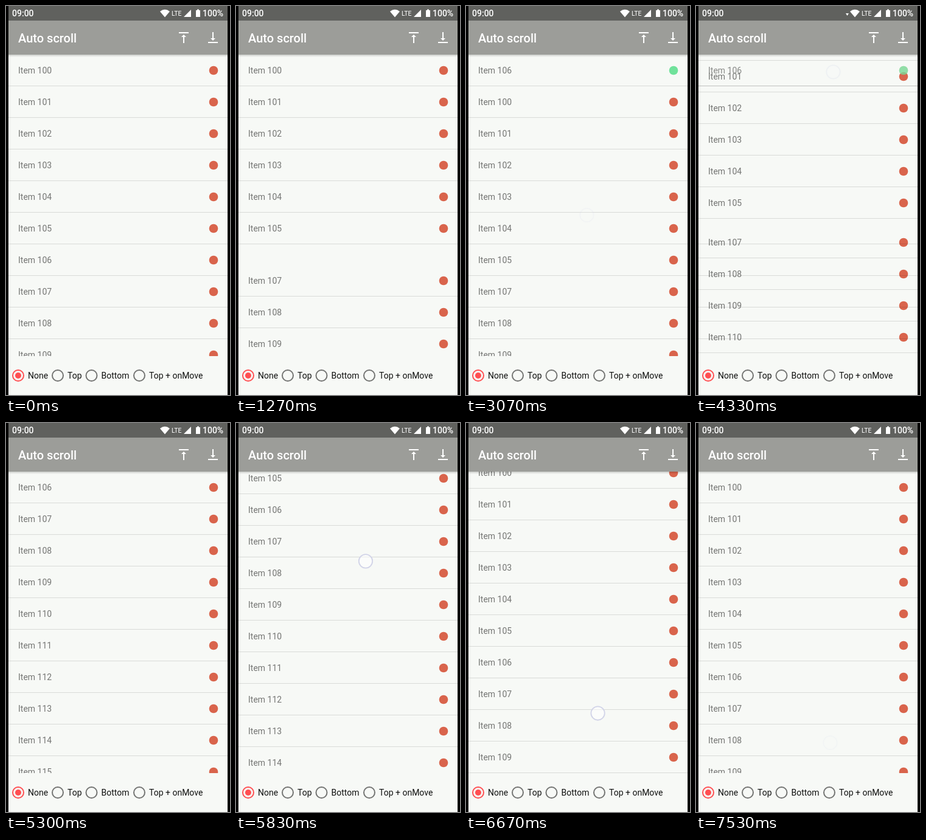
Write an HTML page with a canvas that moves like this. It is 368 px wide and 640 px high and loops after 8070 ms.

```html
<!DOCTYPE html>
<html lang="en">
<head>
<meta charset="utf-8">
<title>Auto scroll</title>
<style>
html, body { margin: 0; width: 100%; height: 100%; overflow: hidden; background: #000; }
canvas { display: block; width: 368px; height: 640px; }
</style>
</head>
<body>
<canvas id="stage"></canvas>
<script>
const W = 368, H = 640, LOOP = 8070, ROW = 52;
const BG = '#f7f9f6', RED = '#d9644c', GREEN = '#70e29b', ACCENT = '#ff4f52';
const canvas = document.getElementById('stage');
const ctx = canvas.getContext('2d');
const ratio = window.devicePixelRatio || 1;
canvas.width = W * ratio;
canvas.height = H * ratio;

const alignTop = new Path2D('M8 11h3v10h2V11h3l-4-4-4 4zM4 3v2h16V3H4z');
const alignBottom = new Path2D('M16 13h-3V3h-2v10H8l4 4 4-4zM4 19v2h16v-2H4z');
const wifi = new Path2D('M253 9Q261 2.6 269 9L261 18.4z');
const signal = new Path2D('M292 18L304 6V18z');
const battery = new Path2D('M312 7h2v-1.5h3V7h2v11h-7z');
const activity = new Path2D('M246 12h5l-2.5 4z');

// Drag keys: time, travel past touch slop, speed (px/ms), pointer x
const drags = [
  { keys: [[2000, -8, 0.06, 193], [2430, 44, 0.13, 196], [2800, 76, 0, 198.5]], top: 268, max: 52, release: 2830, until: 4030 },
  { keys: [[5600, -8, 0.02, 212], [5830, 37, 0.36, 213], [6230, 181, 0.31, 213.5], [7230, 336, 0, 220.5]], top: 190, max: 312, release: 7260, until: LOOP }
];
const taps = [{ at: 870, x: 222, y: 418 }, { at: 4030, x: 225.5, y: 108.5 }];

const clamp = (v, lo = 0, hi = 1) => Math.min(hi, Math.max(lo, v));
const span = (t, start, length) => clamp((t - start) / length);
const ease = p => (1 - Math.cos(Math.PI * p)) / 2;
const slotY = slot => 106 + ROW * slot;

function dragAt({ keys }, t) {
  t = clamp(t, keys[0][0], keys[keys.length - 1][0]);
  const i = keys.findIndex((k, j) => j > 0 && t <= k[0]);
  const [t0, a, va, xa] = keys[i - 1], [t1, b, vb, xb] = keys[i];
  const d = t1 - t0, p = (t - t0) / d, q = 1 - p;
  const travel = q * q * (1 + 2 * p) * a + p * p * (3 - 2 * p) * b
    + d * p * q * (q * va - p * vb);
  return { travel, x: xa + (xb - xa) * p };
}

const scrollAt = (drag, t) => Math.round(clamp(dragAt(drag, t).travel, 0, drag.max));

function text(str, x, y, size, color, weight = 400) {
  ctx.font = `${weight} ${size}px Roboto, sans-serif`;
  ctx.fillStyle = color;
  ctx.fillText(str, x, y);
}

function disc(x, y, r, color) {
  ctx.beginPath();
  ctx.arc(x, y, r, 0, Math.PI * 2);
  ctx.fillStyle = color;
  ctx.fill();
}

function ring(x, y, r, color, width = 2) {
  ctx.beginPath();
  ctx.arc(x, y, r, 0, Math.PI * 2);
  ctx.strokeStyle = color;
  ctx.lineWidth = width;
  ctx.stroke();
}

function row(n, y, alpha = 1, color = RED) {
  if (y < 40 || y > 610) return;
  y = Math.round(y);
  ctx.fillStyle = 'rgba(0,0,0,.12)';
  ctx.fillRect(4, y + 25, 360, 1);
  ctx.globalAlpha = alpha;
  text('Item ' + n, 20, y + 5, 14, '#747573');
  disc(341, y, 7.3, color);
  ctx.globalAlpha = 1;
}

// Slot of each item once 106 sits in front of 100
const pinnedSlot = n => n === 106 ? 0 : n < 106 ? n - 99 : n - 100;

function rowsBefore(t) {
  const gone = span(t, 1050, 120), shift = ROW * ease(span(t, 1170, 250));
  for (let n = 100; n <= 110; n++) {
    if (n !== 106) row(n, slotY(n - 100) - (n > 106 ? shift : 0));
    else if (gone < 1) row(n, slotY(6), 1 - gone);
  }
}

function rowsPinned(t) {
  const offset = scrollAt(drags[0], t) - ROW;
  for (let n = 100; n <= 111; n++)
    row(n, slotY(pinnedSlot(n)) + offset, 1, n === 106 ? GREEN : RED);
}

function rowsMoving(t) {
  const linear = span(t, 4246, 250), p = ease(linear);
  for (let n = 100; n <= 110; n++) {
    if (n === 106) continue;
    const from = slotY(pinnedSlot(n)), to = slotY(n - 106);
    row(n, from + (to - from) * p);
  }
  if (linear > 0) {
    row(106, slotY(0), p);
    for (let n = 111; n <= 115; n++) row(n, slotY(n - 106), span(t, 4496, 120));
  }
  if (linear < 1) row(106, slotY(0), 1 - p, GREEN);
}

function rowsAfter(t) {
  const offset = scrollAt(drags[1], t);
  for (let n = 100; n <= 115; n++) row(n, slotY(n - 106) + offset);
}

function list(t) {
  ctx.save();
  ctx.beginPath();
  ctx.rect(4, 80, 360, 496);
  ctx.clip();
  if (t < 1420) rowsBefore(t);
  else if (t < 4030) rowsPinned(t);
  else if (t < 4616) rowsMoving(t);
  else rowsAfter(t);
  const shade = ctx.createLinearGradient(0, 80, 0, 84);
  shade.addColorStop(0, 'rgba(0,0,0,.18)');
  shade.addColorStop(1, 'rgba(0,0,0,0)');
  ctx.fillStyle = shade;
  ctx.fillRect(4, 80, 360, 4);
  ctx.restore();
}

function icon(path, x, y) {
  ctx.save();
  ctx.translate(x, y);
  ctx.fillStyle = '#fff';
  ctx.fill(path);
  ctx.restore();
}

function bars(t) {
  ctx.fillStyle = '#60615e';
  ctx.fillRect(4, 0, 360, 24);
  ctx.fillStyle = '#9c9d99';
  ctx.fillRect(4, 24, 360, 56);
  text('09:00', 10, 17, 14, '#fff', 500);
  text('LTE', 272, 16, 10.5, '#fff');
  text('100%', 323, 17, 14, '#fff', 500);
  text('Auto scroll', 20, 60, 20, '#fff', 500);
  [wifi, signal, battery].forEach(p => icon(p, 0, 0));
  if (t >= 4300 && t < 5300) icon(activity, 0, 0);
  icon(alignTop, 280, 40);
  icon(alignBottom, 328, 40);
}

function radio(label, x, on) {
  ring(x, 608, 9, on ? ACCENT : '#747573');
  if (on) disc(x, 608, 5, ACCENT);
  text(label, x + 16, 613, 14, '#101110');
}

function pointer(x, y, alpha) {
  if (alpha <= 0) return;
  ctx.globalAlpha = alpha;
  disc(x, y, 11, 'rgba(255,255,255,.5)');
  ring(x, y, 11.2, '#d2d4e8', 1.8);
  ctx.globalAlpha = 1;
}

function touches(t) {
  for (const { at, x, y } of taps)
    if (t >= at) pointer(x, y, 1 - span(t, at + 80, 280));
  for (const drag of drags) {
    if (t < drag.keys[0][0] || t >= drag.until) continue;
    const { travel, x } = dragAt(drag, t);
    pointer(x, drag.top + travel, Math.max(0.1, 1 - span(t, drag.release, 270)));
  }
}

function draw(t) {
  ctx.setTransform(ratio, 0, 0, ratio, 0, 0);
  ctx.fillStyle = '#000';
  ctx.fillRect(0, 0, W, H);
  ctx.fillStyle = BG;
  ctx.fillRect(4, 0, 360, H);
  list(t);
  bars(t);
  radio('None', 20, true);
  radio('Top', 85);
  radio('Bottom', 140.5);
  radio('Top + onMove', 219);
  touches(t);
}

const start = performance.now();
function tick() {
  draw((performance.now() - start) % LOOP);
  requestAnimationFrame(tick);
}
tick();
</script>
</body>
</html>
```
